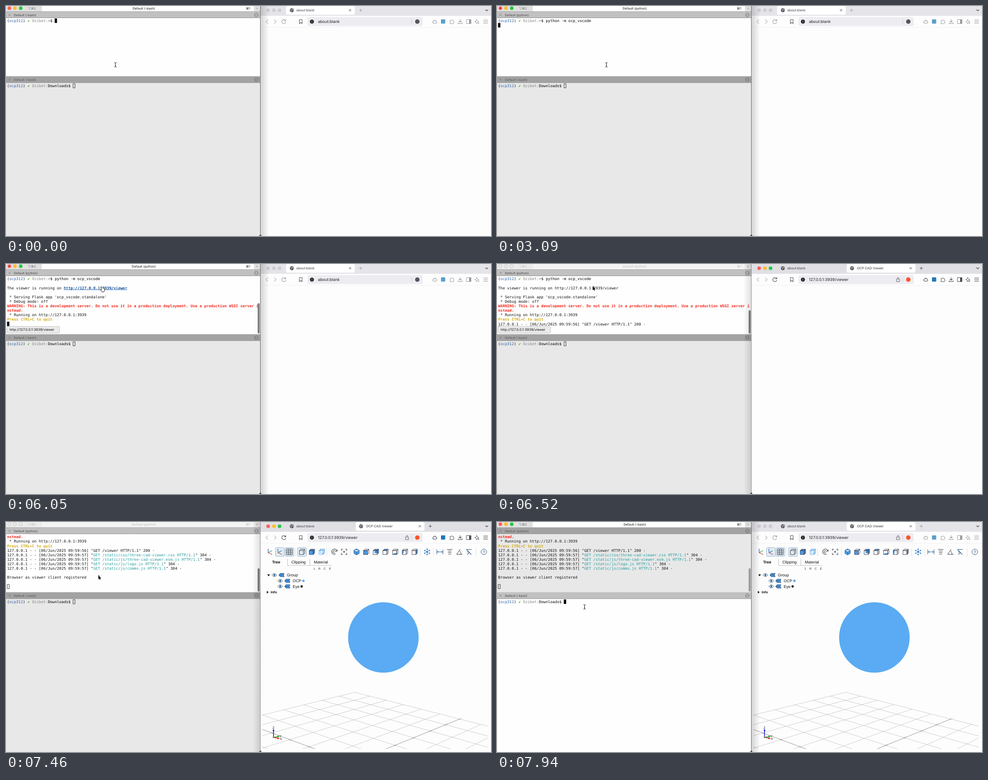
Write an HTML page with a canvas that moves like this. It is 1086 px wide and 516 px high and loops after 7.99 s.

```html
<!DOCTYPE html>
<html lang="en">
<head>
<meta charset="utf-8">
<title>Viewer session</title>
<style>
html, body { margin: 0; width: 100%; height: 100%; overflow: hidden; background: #fff; }
canvas { display: block; }
</style>
</head>
<body>
<canvas id="stage" width="1086" height="516"></canvas>
<script>
const LOOP = 7990;
const ctx = document.getElementById('stage').getContext('2d');
const UI = 'Inter, sans-serif', ARIAL = '"Liberation Sans", Arial, sans-serif';
const MONO = '"DejaVu Sans Mono", monospace';
const CELL = 5.08, ROW = 10.14, LEFT = 2.5;
const INK = '#111', BLUE = '#5aabf3', CUBE = '#4a9be8';
const HOST = 'Ozibet', URL_TEXT = 'http://127.0.0.1:3939/viewer';

// ---- drawing helpers ----
function rect(x, y, w, h, color, r = 0) {
  ctx.fillStyle = color;
  ctx.beginPath();
  ctx.roundRect(x, y, w, h, r);
  ctx.fill();
}
function frame(x, y, w, h, color, r = 0, width = 1) {
  ctx.strokeStyle = color;
  ctx.lineWidth = width;
  ctx.beginPath();
  ctx.roundRect(x, y, w, h, r);
  ctx.stroke();
}
function disc(x, y, r, color, hollow) {
  ctx.beginPath();
  ctx.arc(x, y, r, 0, 7);
  if (hollow) { ctx.strokeStyle = color; ctx.lineWidth = hollow; ctx.stroke(); }
  else { ctx.fillStyle = color; ctx.fill(); }
}
function line(x1, y1, x2, y2, color, width = 1) {
  ctx.strokeStyle = color;
  ctx.lineWidth = width;
  ctx.beginPath();
  ctx.moveTo(x1, y1);
  ctx.lineTo(x2, y2);
  ctx.stroke();
}
function text(s, x, y, size, color, { family = UI, weight = 400, align = 'left' } = {}) {
  ctx.font = `${weight} ${size}px ${family}`;
  ctx.textAlign = align;
  ctx.fillStyle = color;
  ctx.fillText(s, x, y + size * 0.36);
}
// Path around a local origin
function icon(x, y, d, stroke, width = 1, fill) {
  const p = new Path2D(d);
  ctx.save();
  ctx.translate(x, y);
  if (fill) { ctx.fillStyle = fill; ctx.fill(p); }
  if (stroke) { ctx.strokeStyle = stroke; ctx.lineWidth = width; ctx.stroke(p); }
  ctx.restore();
}
function shade(x, w, from, to) {
  const g = ctx.createLinearGradient(x, 0, x + w, 0);
  g.addColorStop(0, `rgba(0,0,0,${from})`);
  g.addColorStop(1, `rgba(0,0,0,${to})`);
  ctx.fillStyle = g;
  ctx.fillRect(x, 0, w, 516);
}
function lights(xs, y, on, off, hollow) {
  ['#ff5f57', '#febc2e', '#28c840'].forEach((c, i) =>
    disc(xs[i], y, on || !hollow ? 4 : 3.6, on ? c : off, !on && hollow));
}

// ---- terminal ----
const prompt = (dir, cmd) => [
  ['(', INK], ['ocp312', '#2d62a8'], [') ', INK], ['✔ ', '#3f9b0b'],
  [HOST + ':', '#808080'], [dir + '$ ' + cmd, '#000']];
const get = (path, code, sec) => {
  const req = `GET ${path} HTTP/1.1`, color = code === 304 ? '#1f9c9c' : INK;
  return [[`127.0.0.1 - - [06/Jun/2025 09:59:${sec}] "`, INK], [req, color], [`" ${code} -`, INK]];
};
const plain = s => [[s, INK]];
const RED = '#f8281c', YELLOW = '#d3a910';
const output = [
  [], [['The viewer is running on ', INK], [URL_TEXT, INK]], [],
  plain(" * Serving Flask app 'ocp_vscode.standalone'"),
  plain(' * Debug mode: off'),
  [['WARNING: This is a development server. Do not use it in a production deployment. Use a production WSGI server i', RED, 700]],
  [['nstead.', RED, 700]],
  plain(' * Running on http://127.0.0.1:3939'),
  [['Press CTRL+C to quit', YELLOW, 700]],
  get('/viewer', 200, 56),
  get('/static/css/three-cad-viewer.css', 304, 57),
  get('/static/js/three-cad-viewer.esm.js', 304, 57),
  get('/static/js/logo.js', 304, 57),
  get('/static/js/comms.js', 304, 57),
  [], plain('Browser as viewer client registered'), []];

function printRow(runs, top) {
  let x = LEFT;
  for (const [s, color, weight] of runs) {
    text(s, x, top + 5.2, 8.44, color, { family: MONO, weight });
    x += s.length * CELL;
  }
  return x;
}
function block(x, top, solid) {
  if (solid) rect(x - 0.2, top, 5.2, 10, '#000');
  else frame(x + 0.3, top + 0.5, 4.4, 9.4, '#222', 0, 0.9);
}
function paneHeader(y, h, name, lit) {
  const cy = y + h / 2 + 0.3, ink = lit ? '#444' : '#555';
  rect(0, y, 569, h, lit ? '#c1c1c1' : '#a3a3a3');
  line(0, y + h, 569, y + h, '#8e8e8e');
  icon(8, cy, 'M-2.6-2.6L2.6 2.6M2.6-2.6L-2.6 2.6', '#777', 0.8);
  text(`Default (${name})`, 17.5, cy, 7, ink);
  disc(560.5, cy, 4, '#555', 0.8);
  for (const d of [-2, 0, 2]) disc(560.5 + d, cy, 0.6, '#555');
}
function outputCount(t) {
  if (t < 2550) return 0;
  if (t < 4760) return -1;
  if (t < 6470) return 9;
  return t < 6530 ? 10 : t < 6590 ? 14 : 17;
}
function terminal(t, front) {
  const lower = t >= 7880, job = t < 3090 ? '-bash' : 'python';
  const tabInk = front ? '#111' : '#bdbdbd';
  // Tab bar
  rect(0, 0, 569, 13, front ? '#fff' : '#f4f4f4');
  rect(0, 0, 80, 13, front ? '#e1e1e1' : '#ececec');
  rect(555, 0, 14, 13, front ? '#e1e1e1' : '#ececec');
  lights([7.5, 20, 33], 5, front, '#b9b9b9', 0.8);
  if (front && t >= 3090 && t < 7940) disc(7.5, 5, 1.3, '#7d1510');
  text('⌥⌘2', 57.5, 5.3, 7, front ? '#666' : '#bdbdbd', { align: 'center' });
  text(`Default (${t >= 7940 ? '-bash' : job})`, 308.5, 5.3, 7, tabInk, { align: 'center' });
  text('⌘1', 542, 5.3, 7, tabInk, { align: 'center' });
  icon(562, 5.5, 'M-3 0H3M0-3V3', '#aaa', 0.8);
  line(0, 12.5, 569, 12.5, '#a6a6a6');

  // Panes
  rect(0, 26, 569, 132, lower ? '#e8e8e8' : '#fefefe');
  rect(0, 172, 569, 344, lower ? '#fefefe' : '#e8e8e8');
  paneHeader(13, 13.5, job, !lower);
  paneHeader(157.5, 14.5, '-bash', lower);

  const typed = t < 990 ? '' : t < 1410 ? 'pytho' : 'python -m ocp_vscode';
  const n = outputCount(t);
  const rows = [prompt('~', typed), ...output.slice(0, Math.max(n, 0))];
  const scroll = Math.max(0, rows.length - 11);
  const link = t >= 5820 && t < 6470;
  let end = LEFT;
  rows.slice(scroll).forEach((runs, i) => {
    const top = 28 + i * ROW;
    end = printRow(runs, top);
    if (link && i === 2) {
      const x = LEFT + 25 * CELL;
      text(URL_TEXT, x, top + 5.2, 8.44, '#1763c6', { family: MONO });
      line(x, top + 9.6, end, top + 9.6, '#1763c6', 0.8);
    }
  });
  const at = n === 0 ? 0 : rows.length - scroll;
  block(n === 0 ? end : LEFT, 28 + at * ROW, front && !lower);
  block(printRow(prompt('Downloads', ''), 173.8), 173.8, front && lower);

  if (t >= 5820) {
    const y = t < 6470 ? 88 : 104;
    rect(563.5, y, 4.5, 156 - y, lower ? '#9a9a9a' : '#808080', 2);
  }
  if (t >= 5820 && t < 7060) {
    rect(2, 140, 118, 15, '#ebebeb', 3);
    frame(2, 140, 118, 15, '#b5b5b5', 3, 0.8);
    text(URL_TEXT, 8, 147.7, 7.75, '#111');
  }
}

// ---- browser ----
function globe(x, y) {
  disc(x, y, 4.5, '#54545c');
  icon(x, y, 'M-3.6-1.5L-1-1L0 1L-1.6 3M1-3.8L1.6-1L3.8 0', '#eee', 1);
}
function browser(t, front) {
  const loaded = t >= 6470, ink = front ? '#44444c' : '#96969e', tabX = loaded ? 783 : 627;
  rect(570, 0, 516, 22, front ? '#dfdfe4' : '#e5e4e9');
  rect(570, 22, 516, 494, '#fdfdfd');
  line(570, 48, 1086, 48, '#f1f1f3');
  lights([587, 600, 612.5], 9.5, front, '#cdccd2');
  rect(tabX, 0, 154, 19.5, '#fff', 4);
  globe(640, 9.5);
  text('about:blank', 650, 9.5, 7.4, '#44444c');
  if (loaded) {
    globe(795, 9.5);
    text('OCP CAD Viewer', 806, 9.5, 7.4, '#33333a');
  }
  icon(tabX + 143.5, 9.5, 'M-2.2-2.2L2.2 2.2M2.2-2.2L-2.2 2.2', '#333', 1);
  icon(tabX + 167, 9.5, 'M-3.5 0H3.5M0-3.5V3.5', ink, 0.9);
  icon(1076.5, 9.5, 'M-3-1.5L0 1.5L3-1.5', '#444', 1.2);

  // Toolbar
  icon(584, 35, 'M2.5-4.5L-2 0L2.5 4.5', '#b6b6bc', 1.2);
  icon(603, 35, 'M-2.5-4.5L2 0L-2.5 4.5', '#b6b6bc', 1.2);
  icon(622, 35, 'M4-2A4.5 4.5 0 1 0 4.3 1.5M4.5-5V-1.7H1.2', ink, 1.1);
  icon(660, 35, 'M-3-4.5H3V4.5L0 2L-3 4.5Z', '#55555d', 1.1);
  rect(675, 25, 258, 20, '#edecf1', 4);
  disc(685, 35, 4.5, '#222');
  line(685, 34.5, 685, 37.2, '#fff', 1);
  disc(685, 32.6, 0.6, '#fff');
  text(loaded ? '127.0.0.1:3939/viewer' : 'about:blank', 698.5, 35, 8.8, '#1d1d22');
  line(908.5, 30, 908.5, 40, '#c9c9d0');
  disc(921, 35, 5, loaded ? '#fb542b' : '#55555f');
  if (loaded) icon(898, 35, 'M-1.5-1.5H-3.5V4.5H3.5V-1.5H1.5M0 1.5V-5M-2-3L0-5L2-3', '#55555d', 0.9);
  icon(960, 35, 'M-3 3.5A2.5 2.5 0 0 1-3-1A3.2 3.2 0 0 1 3-1A2.4 2.4 0 0 1 3 3.5Z', ink, 1.1);
  rect(974, 30, 9.5, 9.5, front ? '#1f78b4' : '#5b9ec9', 1);
  icon(998, 35, 'M-4-2.5H-1.5A1.5 1.5 0 1 1 1.5-2.5H3.5V0A1.5 1.5 0 1 1 3.5 2.7V4.7H-4V2.6A1.5 1.5 0 1 0-4-.4Z', ink, 0.9);
  icon(1017, 35, 'M0-5V1.5M-3-1.5L0 1.5L3-1.5M-4.5 2V4.5H4.5V2', ink, 1.1);
  icon(1036, 35, 'M-5-4.5H5V4.5H-5ZM1.5-4.5H5V4.5H1.5Z', ink, 1);
  rect(1037.5, 31, 3, 8, ink);
  icon(1055, 35, 'M-1-5L.5-1.5L4 0L.5 1.5L-1 5L-2.3 1.5L-5.5 0L-2.3-1.5ZM3 2V5M1.6 3.5H4.6', ink, 0.9);
  icon(1074, 35, 'M-5-3.5H5M-5 0H5M-5 3.5H5', ink, 1.1);
  if (t >= 6590) viewer();
}

// ---- CAD viewer page ----
const GRID = 12;
// Ground plane to screen, u and v in cells from the far corner
function ground(u, v) {
  const a = u / 6, b = v / 6, w = 1 - 0.2099 * a - 0.1456 * b;
  return [(781 - 368.6 * a + 87.1 * b) / w, (382 - 29.6 * a - 4.36 * b) / w];
}
function floorGrid() {
  for (let i = 0; i <= GRID; i++) {
    const color = i === 6 ? '#8a8a8a' : '#c6c6c6';
    line(...ground(i, 0), ...ground(i, GRID), color, 0.9);
    line(...ground(0, i), ...ground(GRID, i), color, 0.9);
  }
  for (let i = 0; i < 6; i++)
    for (const [x, y, tilt] of [[...ground(i, 6), -0.38], [...ground(6, i), 0.36]]) {
      ctx.save();
      ctx.translate(x, y);
      ctx.rotate(tilt);
      text(`-${6 - i}.0`, 0, 0, 4.5, '#999', { family: ARIAL, align: 'center' });
      ctx.restore();
    }
}
function triad() {
  const o = { family: ARIAL, align: 'center' };
  line(599, 483, 599, 468, '#1414e6', 1.6);
  icon(599, 465, 'M0-1L2.2 4H-2.2Z', null, 0, '#1414e6');
  line(599, 483, 609, 481.5, '#0c9b0c', 1.6);
  icon(611, 481, 'M2 0L-3-2.2V2.2Z', null, 0, '#0c9b0c');
  line(599, 483, 609, 485, '#d81010', 1.6);
  icon(611, 485.4, 'M2 0L-3-2.2V2.2Z', null, 0, '#d81010');
  disc(599, 483, 2, '#888');
  text('Z', 599, 461, 7, '#111', o);
  text('Y', 614.5, 480.5, 7, '#111', o);
  text('X', 615.5, 486.5, 7, '#111', o);
}
const FACES = {
  front: 'M-6-3H3V6H-6Z', back: 'M-3-6H6V3H-3Z', top: 'M-6-3L-3-6H6L3-3Z',
  bottom: 'M-6 6L-3 3H6L3 6Z', left: 'M-6-3L-3-6V3L-6 6Z', right: 'M3-3L6-6V3L3 6Z'
};
function cube(x, faces, edge = '#334') {
  for (const f of faces) icon(x, 67, FACES[f], null, 0, CUBE);
  icon(x, 67, FACES.front + FACES.top + FACES.right, edge, 0.9);
}
function toolbar() {
  const y = 67, dark = '#333a44';
  for (const x of [603.5, 625, 653]) {
    rect(x, 57.5, 19.5, 19.5, '#e4edf6', 2);
    frame(x, 57.5, 19.5, 19.5, '#8fa9c4', 2, 0.9);
  }
  for (const x of [648.5, 718, 771, 928, 957, 1053]) line(x, 58, x, 77, '#e0e0e0');
  const axes = x => {
    icon(x, y, 'M-4-7V2', '#2a4fc0', 1.2);
    icon(x, y, 'M-4 2L5-3', '#2f9a46', 1.2);
    icon(x, y, 'M-4 2L5 6', '#c43a3a', 1.2);
  };
  axes(591);
  axes(613);
  disc(613, 67, 1.5, CUBE);
  icon(634.5, y, 'M-6.5-6.5H6.5V6.5H-6.5ZM-2.2-6.5V6.5M2.2-6.5V6.5M-6.5-2.2H6.5M-6.5 2.2H6.5', dark, 1);
  icon(663, y, 'M-6-3H3V6H-6ZM-6-3L-3-6H6L3-3M6-6V3L3 6', dark, 1);
  cube(685, ['front', 'top', 'right']);
  cube(707, [], CUBE);
  icon(707, y, FACES.back, CUBE, 0.8);
  icon(735, y, 'M6-2A6 6 0 1 0 3 5M2.5-.5A2.6 2.6 0 1 0 1.5 2M6.5-5V-1.5H3', dark, 1.1);
  icon(757, y, 'M-6-2.5V-6H-2.5M2.5-6H6V-2.5M6 2.5V6H2.5M-2.5 6H-6V2.5M-2-2L2 2M2-2L-2 2', dark, 1.2);
  icon(785, y, 'M0-7L6-3.5V3.5L0 7L-6 3.5V-3.5ZM-6-3.5L0 0L6-3.5M0 0V7', '#2b5f94', 0.9, CUBE);
  ['front', 'back', 'top', 'bottom', 'left', 'right'].forEach((f, i) => cube(806.5 + i * 21.7, [f]));
  for (let i = 0; i < 6; i++) {
    const dx = Math.sin(i * Math.PI / 3) * 6, dy = Math.cos(i * Math.PI / 3) * 6;
    line(943, y, 943 + dx, y + dy, CUBE, 0.9);
    disc(943 + dx, y + dy, 1.5, '#2c79bd');
  }
  disc(943, y, 2, '#2c79bd');
  icon(971.5, y, 'M-7-5.5V5.5M7-5.5V5.5M-6 0H6M-3.5-2L-6 0L-3.5 2M3.5-2L6 0L3.5 2', '#2f6496', 1);
  icon(993.5, y, 'M-6-5.5H6M-4-2H4M-4 1.5H4M-3 5H3', dark, 1.2);
  icon(1015, y, 'M2-6L-6 5.5H7M0-3Q4 0 4 5.5', dark, 1);
  icon(1037, y, 'M-6-5.5H6M-6-5.5L5 6M-4 6L1 1M-3-2V2', '#2f5680', 1.1);
  disc(1070, y, 6.3, '#2f5680', 1);
  text('?', 1070, y, 10, '#2f5680', { family: ARIAL, align: 'center' });
}
function treeRow(x, y, label, dot) {
  icon(x, y, 'M-5.5 0Q0-7 5.5 0Q0 7-5.5 0Z', '#2c3b4c', 0.9, '#fff');
  disc(x, y, 2.2, '#2f6ea8');
  icon(x + 16, y, 'M-6 0L-3-3.7H6L4 0L6 3.7H-3ZM-6 0H4', '#1d3d60', 0.9, CUBE);
  text(label, x + 28, y, 8.9, '#111', { family: ARIAL });
  if (dot) disc(x + (label === 'OCP' ? 52 : 48), y, 2.7, dot);
}
function viewer() {
  ctx.save();
  ctx.beginPath();
  ctx.rect(574, 49, 505, 460);
  ctx.clip();
  floorGrid();
  triad();
  disc(845, 259, 79, BLUE);
  ctx.restore();
  toolbar();
  const mid = { family: ARIAL, align: 'center' };
  text('Tree', 605, 90, 8.8, '#000', { ...mid, weight: 700 });
  text('Clipping', 655, 90, 8.9, '#111', mid);
  text('Material', 705, 90, 8.9, '#111', mid);
  line(630.5, 83, 630.5, 97, '#bbb');
  line(680.5, 83, 680.5, 97, '#bbb');
  line(630, 97.5, 729, 97.5, '#c4c4c4');
  [...'1RCE'].forEach((c, i) => text(c, 690 + i * 11.8, 104.5, 6.6, '#222', mid));
  icon(588, 119.5, 'M-3-2H3L0 2.5Z', null, 0, '#111');
  treeRow(601, 119, 'Group');
  treeRow(614, 132, 'OCP', BLUE);
  treeRow(614, 144.5, 'Eye', '#333');
  icon(585.5, 157.5, 'M-1.5-3L2.5 0L-1.5 3Z', null, 0, '#111');
  text('Info', 592.5, 157.3, 7.7, '#111', { family: ARIAL, weight: 700 });
}

// ---- pointer ----
const BEAM = 'M-2.5-5Q0-5 0-3.5Q0-5 2.5-5M0-3.5V3.5M-2.5 5Q0 5 0 3.5Q0 5 2.5 5M-1 1.5H1';
const ARROW = 'M0 0V9L2-.6L0 0M0 0V9L2 7L3.4 10L4.8 9.4L3.5 6.5H6.3Z';
const HAND = 'M-4-4.5Q-3-6-2-4.5L-.5-2Q0-3.3 1-2Q2-3 3-1.5Q4.5-2 4.6 0V3Q4 5 3.5 6.5H-1.5Q-3 4-4.5 1.5Q-4.5 0-2 1.5Z';
// Moves along a polyline in n equal held steps
function track(t, start, stop, n, pts) {
  const step = Math.floor((t - start) / (stop - start) * (n - 1)) + 1;
  const k = Math.min(n, Math.max(0, step)) / n * (pts.length - 1);
  const i = Math.min(pts.length - 2, Math.floor(k)), f = k - i;
  return [0, 1].map(c => pts[i][c] + (pts[i + 1][c] - pts[i][c]) * f);
}
function pointer(t) {
  if (t < 6050 || t >= 7700) {
    const [x, y] = t < 6050
      ? track(t, 5240, 5990, 14, [[245, 132], [244, 158], [230, 105], [215, 45], [216, 56]])
      : [196, 190.5];
    icon(x, y, BEAM, '#fff', 2);
    icon(x, y, BEAM, '#111', 1);
  } else if (t < 6470) {
    icon(216, 56, HAND, '#111', 1, '#fff');
  } else {
    const [x, y] = track(t, 7000, 7690, 11, [[214.5, 50], [211, 95], [196, 186]]);
    icon(x, y, ARROW, '#fff', 1.4, '#000');
    icon(x, y, ARROW, null, 0, '#000');
  }
}

function draw() {
  const t = performance.now() % LOOP;
  const webFront = t >= 6470 && t < 7700;
  ctx.textRendering = 'geometricPrecision';
  ctx.clearRect(0, 0, 1086, 516);
  browser(t, webFront);
  terminal(t, !webFront);
  if (webFront) shade(552, 17, 0, 0.12);
  else shade(570, 19, 0.16, 0);
  line(569.5, 0, 569.5, 516, webFront ? '#8c8c8c' : '#666');
  icon(569.5, 516, 'M-4 0Q-.5-.5-.5-4H.5Q.5-.5 4 0Z', null, 0, '#333');
  pointer(t);
  requestAnimationFrame(draw);
}
draw();
</script>
</body>
</html>
```
